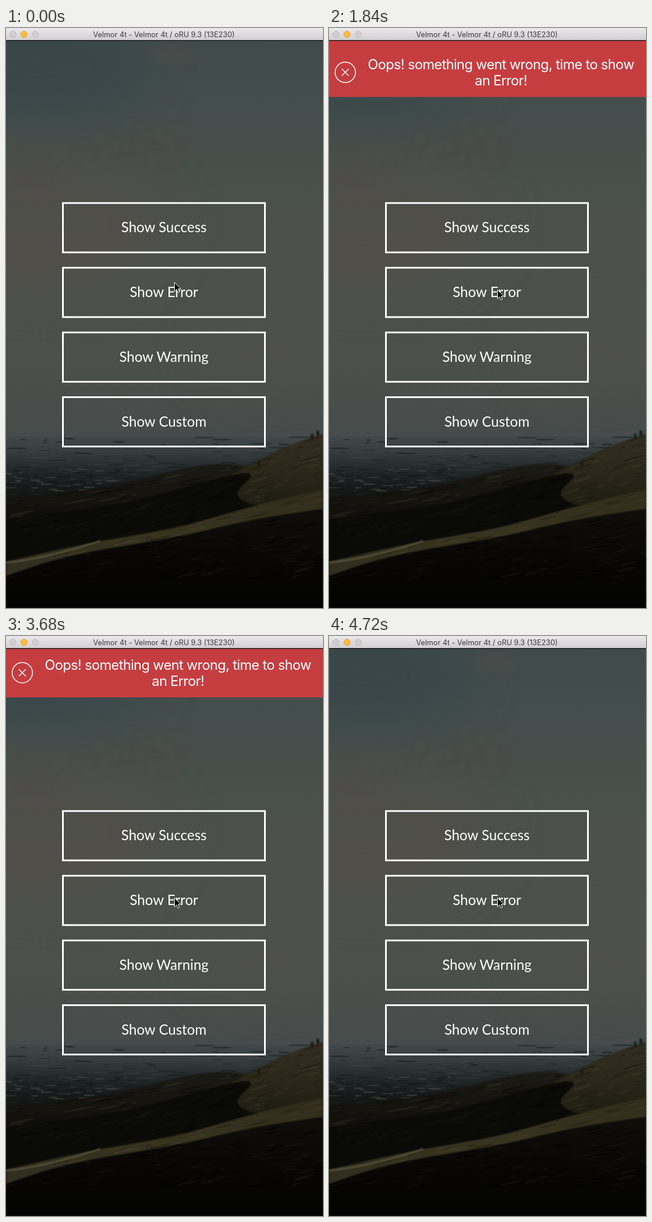
Recreate the animation shown at these times as an HTML page with a canvas. Size 554 px wide and 1011 px high, loop 4.8 s.

```html
<!DOCTYPE html>
<html lang="en">
<head>
<meta charset="utf-8">
<title>Dropdown alert</title>
<style>
  html, body { margin: 0; width: 100%; height: 100%; overflow: hidden; background: #000; }
  canvas, svg { position: absolute; left: 0; top: 0; }
  text { text-anchor: middle; }
  .label { font: 24.5px Lato, "Open Sans", sans-serif; fill: #fff; }
  .alert { font: 24px Inter, Roboto, sans-serif; letter-spacing: -.027em; fill: #fff; }
  .title { font: 12.8px Inter, Roboto, sans-serif; fill: #3b3a3b; }
</style>
</head>
<body>
<canvas id="photo" width="554" height="1011"></canvas>
<svg width="554" height="1011" viewBox="0 0 554 1011">
  <defs>
    <linearGradient id="bar" x2="0" y2="1">
      <stop stop-color="#ebe9eb"/>
      <stop offset="1" stop-color="#d0ced0"/>
    </linearGradient>
  </defs>
  <g id="buttons"></g>
  <g id="banner">
    <rect y="-200" width="554" height="307" fill="#c63d40"/>
    <g fill="none" stroke="#fff" stroke-width="1.5">
      <circle cx="28.5" cy="64" r="17.8"/>
      <path d="M22.5 58l12 12m0-12l-12 12"/>
    </g>
    <text class="alert" x="300.5" y="58.7">Oops! something went wrong, time to show</text>
    <text class="alert" x="300.5" y="86.7">an Error!</text>
  </g>
  <rect width="554" height="22" fill="url(#bar)"/>
  <rect y="21" width="554" height="1.5" fill="#1b1d1e"/>
  <g fill="#d0ced0" stroke="#bbb9bb">
    <circle cx="12" cy="11" r="5.5"/>
    <circle cx="31.5" cy="11" r="5.5" fill="#fdbc40" stroke="#e0a030"/>
    <circle cx="51.5" cy="11" r="5.5"/>
  </g>
  <text class="title" x="276" y="15.7">Velmor 4t - Velmor 4t / oRU 9.3 (13E230)</text>
  <path id="cursor" d="M0 0V15.5L3.6 12.2L6 17.6L8.6 16.5L6.2 11.2H11Z" fill="#000" stroke="#fff"/>
</svg>
<script>
const $ = id => document.getElementById(id);
const W = 554, H = 1011, LOOP = 4800, STEP = 80;

// ---- landscape ----
const ctx = $("photo").getContext("2d");
let seed = 7;
const rnd = () => (seed = seed * 16807 % 2147483647) / 2147483647;
const between = (a, b) => a + (b - a) * rnd();

// Vertical gradient with evenly spaced colours.
function fade(y0, y1, ...colors) {
  const g = ctx.createLinearGradient(0, y0, 0, y1);
  colors.forEach((c, i) => g.addColorStop(i / (colors.length - 1), c));
  return g;
}

function blob(x, y, rx, ry, color, blur = 0, tilt = 0) {
  ctx.filter = blur ? `blur(${blur}px)` : "none";
  ctx.fillStyle = color;
  ctx.beginPath();
  ctx.ellipse(x, y, rx, ry, tilt, 0, 7);
  ctx.fill();
}

// Ground below a smooth line of points, textured with seeded streaks.
function ground(points, fill, tilt = 0, streaks = 0, ...colors) {
  const path = new Path2D();
  path.moveTo(0, H);
  path.lineTo(...points[0]);
  points.forEach(([x, y], i) => {
    const [nx, ny] = points[i + 1] || [W, y];
    path.quadraticCurveTo(x, y, (x + nx) / 2, (y + ny) / 2);
  });
  path.lineTo(...points.at(-1));
  path.lineTo(W, H);
  ctx.filter = "blur(1px)";
  ctx.fillStyle = fill;
  ctx.fill(path);
  ctx.save();
  ctx.clip(path);
  const top = Math.min(...points.map(p => p[1]));
  for (let i = 0; i < streaks; i++)
    blob(between(0, W), between(top, top + 120), between(4, 22), between(.5, 2), colors[i % colors.length], 0, tilt);
  ctx.restore();
}

function sky() {
  ctx.fillStyle = fade(0, 720, "#404a4b", "#444e4c", "#4a504b", "#4d514c", "#4c504c", "#464c4b");
  ctx.fillRect(0, 0, W, H);
  blob(50, 70, 200, 85, "#36464ab0", 40);
  blob(60, 340, 230, 120, "#534f4990", 40);
  blob(460, 570, 130, 80, "#52504b60", 35);
  blob(290, 45, 42, 15, "#504f4990", 9);
  for (let i = 0; i < 60; i++) {
    const x = between(0, 320);
    blob(x, between(190, 260) - 25 * Math.sin(x / 60 - 2.6), between(8, 26), between(6, 16), "#55514b28", 3);
  }
}

function land() {
  // plain with fields and roofs
  ground([[0, 712], [W, 712]], fade(708, 830, "#444a4b", "#363d3f", "#22292b", "#161a1a", "#11120e"),
    0, 160, "#14191b70", "#474c4c40");
  for (let i = 0; i < 80; i++)
    blob(between(0, 220), between(768, 808), between(2, 12), between(.5, 1.5), i % 2 ? "#484c4a90" : "#10151690");
  // far hills, then the long sunlit slope
  ground([[0, 822], [190, 800], [340, 758], [430, 762], [W, 800]], fade(755, 860, "#1c1c17", "#15140f", "#100f0b"),
    -.2, 200, "#0908067a", "#2c281b80");
  ground([[300, 835], [400, 775], [480, 732], [W, 707]], fade(707, 840, "#332e21", "#2b2719", "#1e1b11"),
    -.3, 260, "#15130c70", "#443d2860");
  // woods
  ground([[0, 856], [200, 832], [330, 796], [450, 766], [380, 826], [W, 850]], "#0a0a07",
    -.25, 160, "#16150fa0", "#040403a0");
  // meadow
  ground([[0, 930], [140, 898], [300, 872], [420, 836], [W, 804]], fade(805, 960, "#322d1c", "#38331f", "#302c20"),
    -.22, 260, "#48412a60", "#19170f60");
  // shaded foreground
  ground([[0, 955], [110, 918], [300, 888], [430, 856], [W, 838]], fade(838, H, "#0f0e09", "#080705", "#030303"),
    -.2, 160, "#1e1b1160", "#03030390");
  ctx.filter = "blur(1px)";
  ctx.strokeStyle = "#5a5540";
  ctx.lineWidth = 2.5;
  ctx.stroke(new Path2D("M0 932Q75 924 165 894"));
  for (const x of [442, 535, 545]) blob(x, 990 - .52 * x, 2.5, 5, "#171b1a", 1);
}

sky();
land();

// ---- buttons ----
$("buttons").innerHTML = ["Success", "Error", "Warning", "Custom"].map((name, i) => {
  const y = 303.6 + i * 112.8;
  return `<rect x="99.5" y="${y + 1.5}" width="353" height="86" fill="none" stroke="#fff" stroke-width="3"/>
    <text class="label" x="276" y="${y + 52.5}">Show ${name}</text>`;
}).join("");
const pressed = document.querySelectorAll(".label")[1];

// ---- motion ----
// Back easing: w is the time in seconds to or from the resting pose.
const slide = w => 291 * w * w - 377 * w ** 3;

function draw(now) {
  const t = Math.floor(now % LOOP / STEP) * STEP, s = t / 1000;
  const w = Math.max(0, 2.54 - s, s - 3.68);
  $("banner").setAttribute("transform", `translate(0 ${slide(w).toFixed(1)})`);
  pressed.setAttribute("opacity", t >= 1120 && t < 1360 ? .58 : 1);
  const y = 443.5 + 13 * Math.min(1, t / 240);
  $("cursor").setAttribute("transform", `translate(294.5 ${y})`);
}

const start = performance.now();
function tick() {
  draw(performance.now() - start);
  requestAnimationFrame(tick);
}
tick();
</script>
</body>
</html>
```
